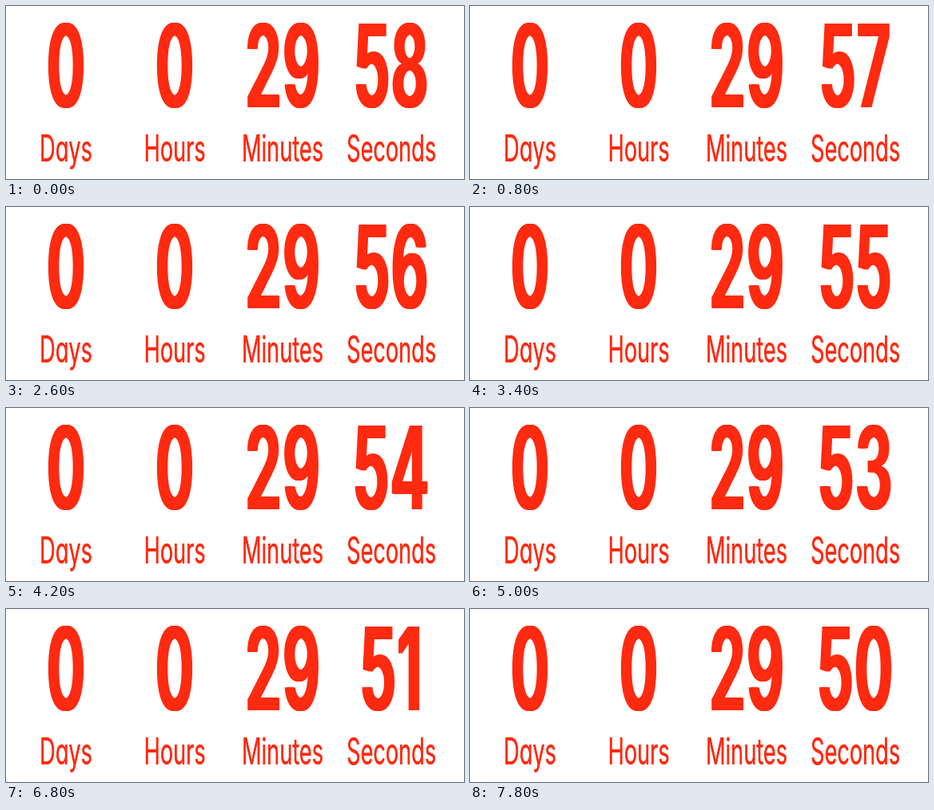
Recreate the animation shown at these times as an HTML page. Size 573 by 217 pixels, loop 8 s.

```html
<!DOCTYPE html>
<html lang="en">
<head>
<meta charset="utf-8">
<title>Countdown</title>
<style>
  html, body {
    margin: 0;
    width: 100%;
    height: 100%;
    overflow: hidden;
    background: #fff;
  }
  .number, .label {
    position: absolute;
    color: #ff2a10;
    font-family: Inter, Roboto, sans-serif;
    line-height: 1;
    white-space: nowrap;
  }
  /* Condensed faces; the side shadows keep the upright stems heavy. */
  .number {
    top: 74.5px;
    font-size: 144px;
    font-weight: 600;
    letter-spacing: 4px;
    padding-left: 4px;
    transform: translate(-50%, -50%) scaleX(.5);
    text-shadow: -4px 0, -2px 0, 2px 0, 4px 0;
  }
  .label {
    top: 178px;
    font-size: 46px;
    font-weight: 400;
    font-feature-settings: "cv11";
    transform: translate(-50%, -50%) scaleX(.59);
    text-shadow: .4px 0;
  }
</style>
</head>
<body>
<script>
  const LOOP = 8000;
  const FIRST_SECOND = 58;
  const TICK_OFFSET = 200; // the first tick falls 800 ms into the loop

  function addText(className, x, text) {
    const element = document.createElement("div");
    element.className = className;
    element.style.left = x + "px";
    element.textContent = text;
    document.body.append(element);
    return element;
  }

  function addUnit(x, value, name) {
    addText("label", x, name);
    return addText("number", x, value);
  }

  addUnit(75, 0, "Days");
  addUnit(210.5, 0, "Hours");
  addUnit(346, 29, "Minutes");
  const seconds = addUnit(481.5, FIRST_SECOND, "Seconds");

  function draw() {
    const time = performance.now() % LOOP;
    const value = String(FIRST_SECOND - Math.floor((time + TICK_OFFSET) / 1000));
    if (seconds.textContent !== value) seconds.textContent = value;
    requestAnimationFrame(draw);
  }
  draw();
</script>
</body>
</html>
```
